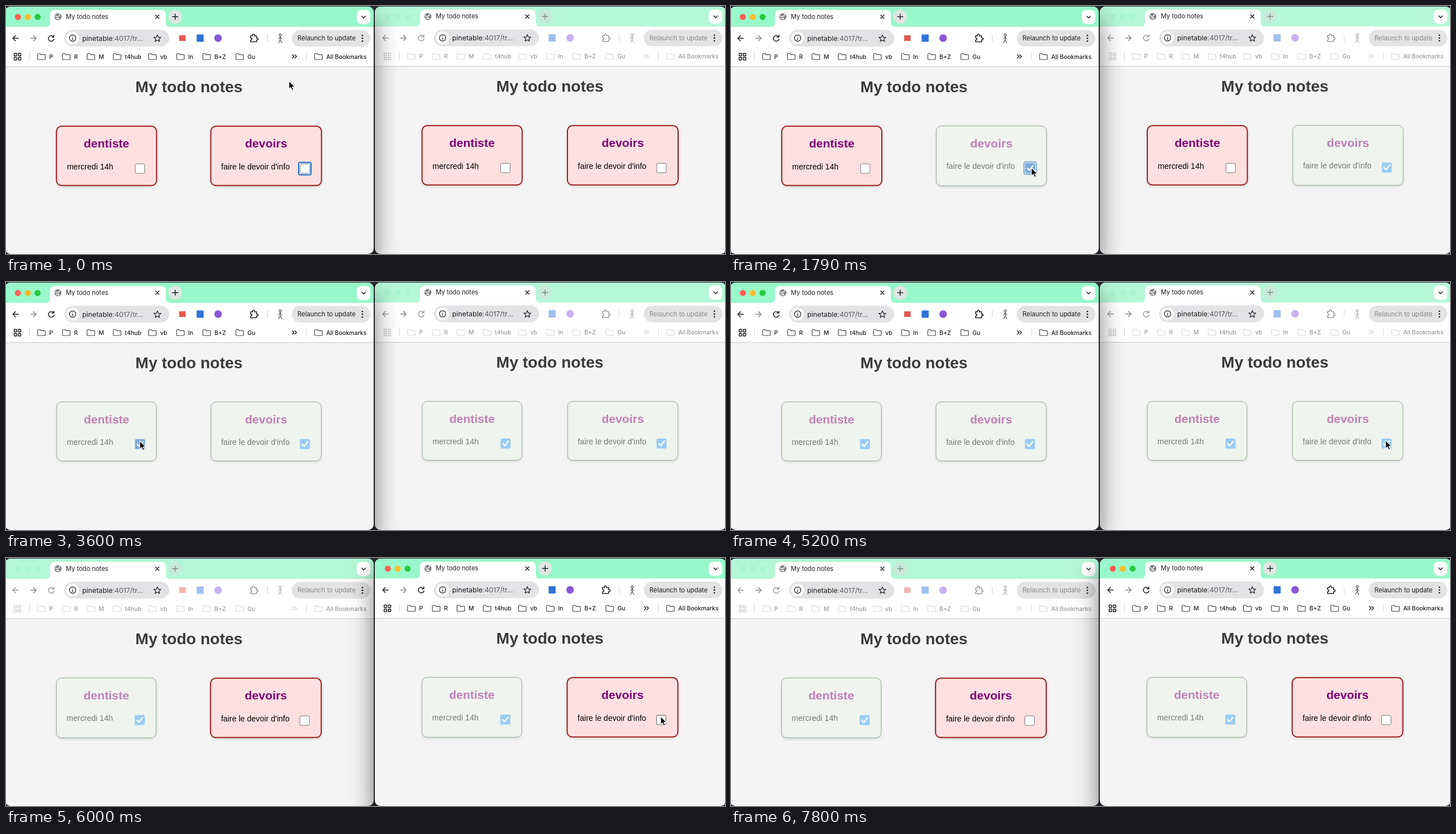
Animation, 1273 px wide and 440 px high, one loop 7.9 s. Source, as an HTML page:

```html
<!DOCTYPE html>
<html lang="en">
<head>
<meta charset="utf-8">
<title>My todo notes</title>
<style>
html, body { margin: 0; width: 100%; height: 100%; overflow: hidden; background: #2b2b30; }
.win { position: absolute; top: 1px; height: 439px; overflow: hidden; border-radius: 10px; background: #f4f4f4; }
.win.on { z-index: 1; box-shadow: 0 22px 44px rgba(0, 0, 0, .55); }
svg { position: absolute; display: block; }
#pointer { z-index: 2; left: 0; top: 0; }
text { font-family: Inter, Roboto, sans-serif; white-space: pre; }
.page text { font-family: "Liberation Sans", Arial, sans-serif; }
.line { fill: none; stroke: #1f1f1f; stroke-width: 1.5; stroke-linecap: round; stroke-linejoin: round; }
.bar { fill: #b4f7d8; }
.on .bar { fill: #98f8cb; }
.lights { fill: #a9f4d1; }
.on .lights :nth-child(1) { fill: #ff5f57; }
.on .lights :nth-child(2) { fill: #febc2e; }
.on .lights :nth-child(3) { fill: #28c840; }
.plus { fill: #c6e9da; }
.on .plus { fill: #dfe6e3; }
.soft { opacity: .45; }
.faint { opacity: .2; }
.on .soft, .on .faint { opacity: 1; }
.card { filter: drop-shadow(0 2px 2px rgba(0, 0, 0, .1)); }
</style>
</head>
<body>
<svg id="pointer" width="1273" height="440">
  <path id="cursor" d="M0 0V14.5L3.3 11.4 5.6 16.7 8.1 15.6 5.8 10.5H10.4Z" stroke="#fff" stroke-width="1.1"/>
</svg>
<script>
const LOOP = 7900, TICK = 200;

// x, w: window box; l, r: shift of left- and right-anchored parts; from, to: outer edges of the card row
const wins = [
  { x: -2, w: 653, l: 0, r: 0, mid: 324, from: 88.4, to: 559.6, dy: 0 },
  { x: 653, w: 621.5, l: 655, r: 623.2, mid: 963, from: 735.6, to: 1191, dy: -1 }
];

const notes = [
  { title: 'dentiste', text: 'mercredi 14h', w: 179.2 },
  { title: 'devoirs', text: "faire le devoir d'info", w: 198 }
];

// Times at which each note is toggled, per window
const toggles = [
  [[3400], [1600, 6000]],
  [[3600], [1790, 5800]]
];

// Start time, then one position per tick
const moves = [
  [0, [501, 133]],
  [200, [504, 150], [519, 185], [537, 238], [543, 300], [532, 287]],
  [2600, [526, 287], [455, 283], [345, 280], [260, 281], [238, 282], [237, 282]],
  [4000, [241, 288], [330, 310], [560, 317], [850, 305], [1080, 285], [1174, 274]],
  [5200, [1159, 281]],
  [6800, [1157, 284], [1150, 290], [1136, 297], [1117, 303], [1102, 306]]
];

const text = (x, y, size, str, attrs = '') =>
  `<text x="${x}" y="${y}" font-size="${size}" ${attrs}>${str}</text>`;
const line = (d, attrs = '') => `<path class="line" d="${d}" ${attrs}/>`;
const rect = (x, y, w, h, r, attrs) =>
  `<rect x="${x}" y="${y}" width="${w}" height="${h}" rx="${r}" ${attrs}/>`;
const dot = (x, y, r, attrs = '') => `<circle cx="${x}" cy="${y}" r="${r}" ${attrs}/>`;
const group = (cls, ...parts) => `<g class="${cls}">${parts.join('')}</g>`;

const bookmark = (x, label) =>
  group('faint', line(`M${x - 20.5} 94v-8.5q0-1 1-1h3.5l1.8 1.8h6.2q1 0 1 1v6.7q0 1-1 1h-11.5q-1 0-1-1`,
    'style="stroke-width:1.2;stroke:#444"')) +
  group('soft', text(x, 93.5, 10.4, label, 'font-weight="500" fill="#1f1f1f"'));
const divider = (x, y, h) => rect(x, y, 1, h, 0, 'fill="#cfd3d1"');

function leftChrome() {
  const labels = { P: 76.5, R: 120.5, M: 164, t4hub: 210.5, vb: 273, In: 322.5, 'B+Z': 369, Gu: 427.5 };
  return group('lights', dot(21, 19.5, 5.4), dot(38.5, 19.5, 5.4), dot(56, 19.5, 5.4)) +
    '<path d="M70 37q8 0 8-8V16q0-9 9-9H274q9 0 9 9v13q0 8 8 8Z" fill="#fff"/>' +
    dot(92, 19, 6.3, 'fill="#85888b"') +
    line('M87.5 17.5q3 3 5 1t3-4M89.5 22.5l3-1 1 2.5', 'style="stroke:#fff;stroke-width:1.4"') +
    text(106, 22.8, 11.1, 'My todo notes', 'fill="#1f1f1f"') +
    line('M265 16l6 6M271 16l-6 6') +
    dot(299.5, 19, 12.3, 'class="plus"') +
    group('soft', line('M294.7 19h9.6M299.5 14.2v9.6')) +
    group('soft', line('M22 57.3H12.5M16.8 52.6l-4.7 4.7 4.7 4.7'),
      line('M84.2 54.5a5 5 0 1 0 .8 4.2M84.8 51.8v3.4h-3.4')) +
    line('M43.5 57.3H53M48.7 52.6l4.7 4.7-4.7 4.7', 'style="stroke:#8b8b8d"') +
    rect(103, 42, 186, 30, 15, 'fill="#e3e3e6"') +
    dot(118, 57, 11.3, 'fill="#fff"') +
    line('M118 56.5v3.6M118 53.7v.1', 'style="stroke-width:1.3"') +
    dot(118, 57, 5.6, 'class="line" style="stroke-width:1.2"') +
    text(135, 61.6, 12.3, 'pinetable<tspan fill="#5a5c5f">:4017/tr...</tspan>', 'fill="#1f1f1f"') +
    line('M268 51.3l1.7 4 4.4.4-3.3 2.9 1 4.3-3.8-2.3-3.8 2.3 1-4.3-3.3-2.9 4.4-.4Z', 'style="stroke-width:1.2"') +
    group('faint', ...[14.5, 21.8].flatMap(x => [84, 91.3].map(y =>
      rect(x, y, 4.4, 4.4, .3, 'class="line"')))) +
    divider(41, 83, 13) +
    Object.entries(labels).map(([label, x]) => bookmark(x, label)).join('');
}

function rightChrome(first) {
  return rect(621, 7, 24, 25, 8, 'fill="#fff"') +
    line('M630 18l3.2 3.2 3.2-3.2') +
    group('soft', first ? rect(306.5, 52, 11.5, 10, 0, 'fill="#e5574f"') : '',
      rect(337.5, 50.5, 12.5, 13, 1, 'fill="#2f73d8"'),
      dot(375.5, 57, 6.7, 'fill="#8656d6"')) +
    group('soft', line('M433 53h3.4q-.8-3 1.6-3t1.6 3h4v4q3-.6 3 1.5t-3 1.5v3.6H433v-3q2.4-.4 2.4-2t-2.4-2Z')) +
    divider(462, 50, 14) +
    group('soft', line('M485.5 53.5v6l-2.8 6M485.5 59.5l2.8 6M482.3 58.5l3.2-3.5 3.2 3.5', 'style="stroke-width:1"'),
      dot(485.5, 51.3, 2, 'class="line" style="stroke-width:1"')) +
    rect(506, 42.5, 139, 29.5, 14.7, 'fill="#e3e3e4"') +
    group('soft', text(516, 61.3, 11.3, 'Relaunch to update', 'fill="#1f1f1f"')) +
    [52.3, 57.3, 62.3].map(y => dot(631, y, 1.4, 'fill="#1f1f1f"')).join('') +
    group('faint', line('M507 86.5l3 3-3 3M511.3 86.5l3 3-3 3')) +
    divider(531.5, 83, 13) +
    bookmark(567, 'All Bookmarks');
}

function build(win, i) {
  const el = document.createElement('div');
  el.className = 'win';
  el.style.left = win.x + 'px';
  el.style.width = win.w + 'px';
  const x = win.x - 10, w = win.w + 20;
  el.innerHTML = `<svg width="1290" height="440" style="left:${-win.x}px;top:-1px">
    <g transform="translate(0 ${win.dy / 2})">
      ${rect(x, -5, w, 42, 0, 'class="bar"')}
      ${rect(x, 37, w, 70, 0, 'fill="#fff"')}
      ${rect(x, 107, w, 1, 0, 'fill="#c9c9c9"')}
      <g transform="translate(${win.l})">${leftChrome()}</g>
      <g transform="translate(${win.r})">${rightChrome(i === 0)}</g>
    </g>
    <g class="page" transform="translate(0 ${win.dy})">
      ${text(win.mid, 153, 28, 'My todo notes', 'font-weight="700" text-anchor="middle" fill="#3a3a3a"')}
      <g class="cards"></g>
    </g></svg>`;
  document.body.append(el);
  win.el = el;
  win.cards = el.querySelector('.cards');
}

function checkbox(x, y, done, hot, ring) {
  const tick = line(`M${x + 4} ${y + 9.2}l3.4 3.6 6.4-8`, 'style="stroke:#fff;stroke-width:2.3"');
  const box = done
    ? rect(x, y, 17.8, 17.8, 2, `fill="${hot ? '#7fa9d8' : '#9cccf3'}"`) + tick
    : rect(x + .5, y + .5, 16.8, 16.8, 2.2, `fill="#fff" stroke="${hot ? '#4f4f4f' : '#767676'}"`);
  const halo = rect(x - 2, y - 2, 21.8, 21.8, 2.5,
    `fill="#fff" stroke="#1264c4" stroke-width="2" opacity="${done ? .5 : 1}"`);
  return (ring ? halo : '') + box;
}

function drawCards(win, i, t, pos) {
  const done = toggles[i].map(times => times.filter(at => t >= at).length % 2 === 1);
  const count = done.filter(Boolean).length;
  const inset = count * .44;
  const top = 212.3, h = count === 2 ? 105.6 : 107.2;
  win.cards.innerHTML = notes.map((note, n) => {
    const off = done[n], b = off ? 1 : 2;
    const w = note.w - (off ? 1.75 : 0);
    const x = n ? win.to - inset - w : win.from + inset;
    const boxX = x + w - b - 37.4, boxY = off ? 278.7 : 279.6;
    const over = Math.abs(pos[0] - boxX - 9) < 9 && Math.abs(pos[1] - win.dy - boxY - 9) < 9;
    const hot = over && (i === 0 || t >= 5800);
    const ring = i === 0 && n === 1 && t < 3400;
    return rect(x + b / 2, top + b / 2, w - b, h - b, 9,
      `class="card" fill="${off ? '#eff4ee' : '#ffe0e0'}" stroke="${off ? '#92a890' : '#9a1c20'}" stroke-width="${b}"`) +
      text(x + w / 2, off ? 250.6 : 251.4, 21, note.title,
        `font-weight="700" text-anchor="middle" fill="${off ? '#c080b4' : '#7d0078'}"`) +
      text(x + b + 17.5, off ? 289 : 290, 14.05, note.text, `fill="${off ? '#777a77' : '#000'}"`) +
      checkbox(boxX, boxY, off, hot, ring);
  }).join('');
}

function cursorAt(t) {
  const [start, ...path] = moves.findLast(move => t >= move[0]);
  return path[Math.min(path.length - 1, Math.floor((t - start) / TICK))];
}

const cursor = document.getElementById('cursor');
const began = performance.now();
wins.forEach(build);

function draw() {
  const t = (performance.now() - began) % LOOP;
  const pos = cursorAt(t);
  const active = t >= 5400 ? 1 : 0;
  wins.forEach((win, i) => {
    win.el.classList.toggle('on', i === active);
    drawCards(win, i, t, pos);
  });
  cursor.setAttribute('transform', `translate(${pos})`);
  cursor.style.display = t >= 7800 ? 'none' : '';
  requestAnimationFrame(draw);
}
draw();
</script>
</body>
</html>
```
